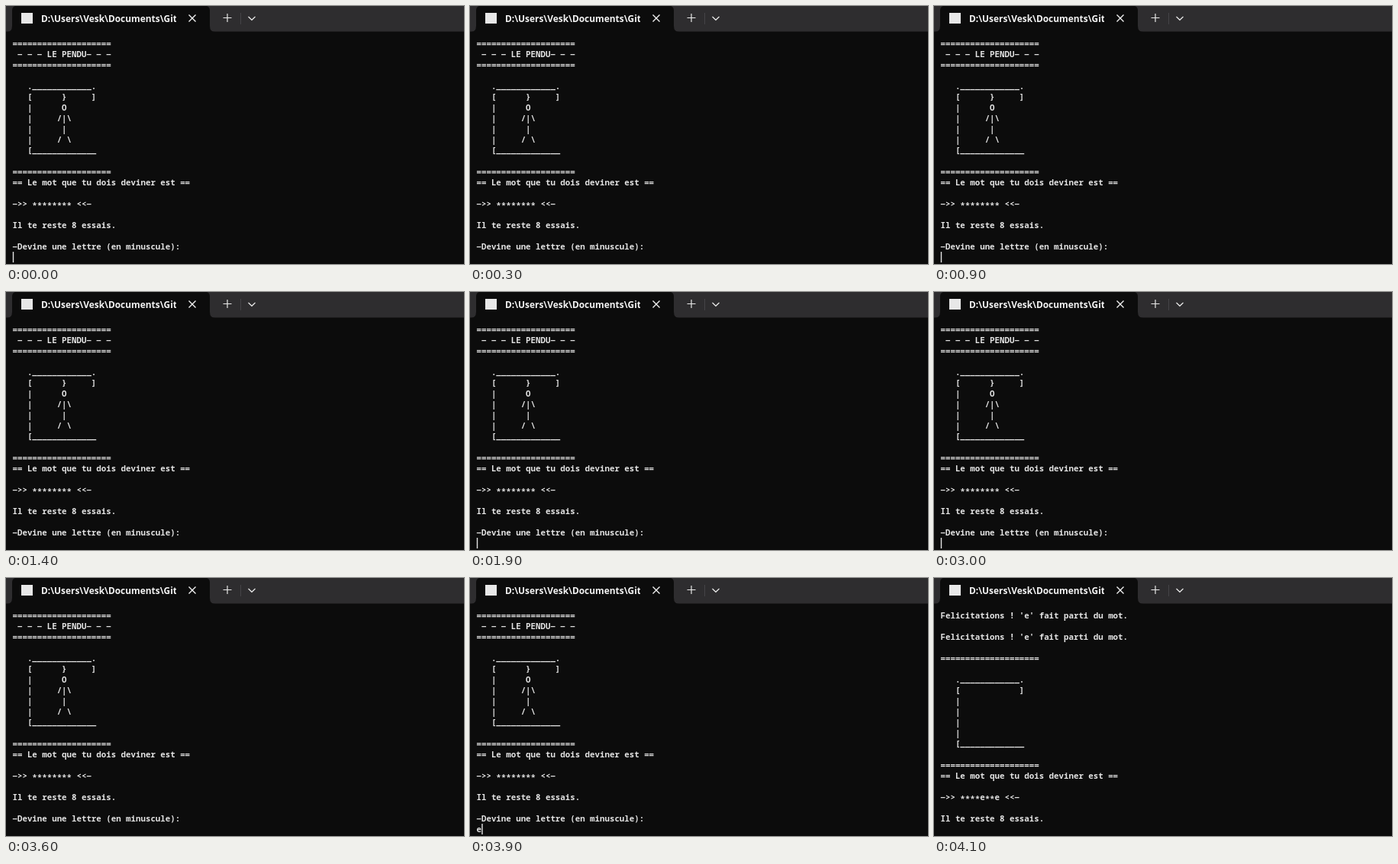
An HTML page with a canvas that plays this animation: 600 by 338 pixels, repeating every 8 s.

```html
<!DOCTYPE html>
<html lang="fr">
<head>
<meta charset="utf-8">
<title>Le pendu</title>
<style>
  html, body { margin: 0; width: 100%; height: 100%; overflow: hidden; background: #0c0c0c; }
  canvas { display: block; }
</style>
</head>
<body>
<canvas id="stage" width="600" height="338"></canvas>
<script>
const ctx = document.getElementById('stage').getContext('2d');
const LOOP = 8000, TYPED = 3900, ANSWERED = 4100;
const BLINKS = [300, 900, 1400, 1900, 2500, 3000, 3600];
const LEFT = 8.5, CELL = 6.46, ROW = 14, BASELINE = 53;
const TEXT_FONT = 'bold 10.77px "Noto Sans Mono", monospace';
const SIGN_FONT = 'bold 10.73px "DejaVu Sans Mono", monospace'; // wide = and -
const SHIFT = { '*': 2, '_': -1 };
const RULE = '='.repeat(20);

// The gallows, with the rope, head, arms, body and legs given row by row
const gallows = (rope = '', head = '', arms = '', body = '', legs = '') => [
  '   .' + '_'.repeat(12) + '.',
  '   [' + rope.padEnd(12) + ']',
  '   |' + head,
  '   |' + arms,
  '   |' + body,
  '   |' + legs,
  '   [' + '_'.repeat(13)
];

const status = word => [
  '',
  RULE,
  '== Le mot que tu dois deviner est ==',
  '',
  `->> ${word} <<-`,
  '',
  'Il te reste 8 essais.'
];

const question = [
  RULE,
  ' - - - LE PENDU- - -',
  RULE,
  '',
  ...gallows('      }', '      O', '     /|\\', '      |', '     / \\'),
  ...status('********'),
  '',
  '-Devine une lettre (en minuscule):'
];

const praise = "Felicitations ! 'e' fait parti du mot.";
const answer = [praise, '', praise, '', RULE, '', ...gallows(), ...status('****e**e')];

function stroke(path, color = '#e8e8e8', width = 1.2) {
  ctx.strokeStyle = color;
  ctx.lineWidth = width;
  ctx.stroke(new Path2D(path));
}

function drawTabBar() {
  ctx.fillStyle = '#2e2d2f';
  ctx.fillRect(0, 0, 600, 33.5);
  ctx.fillStyle = '#0c0c0c';
  ctx.fill(new Path2D('M1 34Q8 34 8 26V6Q8 1 12 0H263Q267 1 267 6V26Q267 34 274 34Z'));

  ctx.fillStyle = '#e8e8e8';
  ctx.fillRect(20, 9, 15, 14);

  ctx.save();
  ctx.beginPath();
  ctx.rect(46, 0, 177, 33);
  ctx.clip();
  ctx.fillStyle = '#f2f2f2';
  ctx.font = 'bold 11.9px "Open Sans", sans-serif';
  ctx.fillText('D:\\Users\\Vesk\\Documents\\Git', 46, 21);
  ctx.restore();

  stroke('M239.5 11.5l9 9m0 -9l-9 9', '#f2f2f2', 1.4);
  stroke('M284.5 15.5h11m-5.5 -5.5v11');
  stroke('M307.5 9v15', '#454447', 1);
  stroke('M317.5 14l4.5 4.3 4.5 -4.3');
}

function drawLine(text, row) {
  [...text].forEach((char, col) => {
    ctx.font = /[=-]/.test(char) ? SIGN_FONT : TEXT_FONT;
    const y = BASELINE + row * ROW + (SHIFT[char] || 0);
    ctx.fillText(char === '-' ? '\u2212' : char, LEFT + col * CELL, y);
  });
}

function draw(now) {
  const t = now % LOOP;
  ctx.fillStyle = '#0c0c0c';
  ctx.fillRect(0, 0, 600, 338);
  drawTabBar();

  ctx.fillStyle = '#e4e4e4';
  if (t >= ANSWERED) {
    answer.forEach(drawLine);
  } else {
    const typed = t >= TYPED ? 'e' : '';
    [...question, typed].forEach(drawLine);
    const cursorOn = typed || BLINKS.filter(b => b <= t).length % 2 === 0;
    if (cursorOn) ctx.fillRect(8.8 + typed.length * CELL, 322, 1.4, 14);
  }
  requestAnimationFrame(draw);
}
requestAnimationFrame(draw);
</script>
</body>
</html>
```
